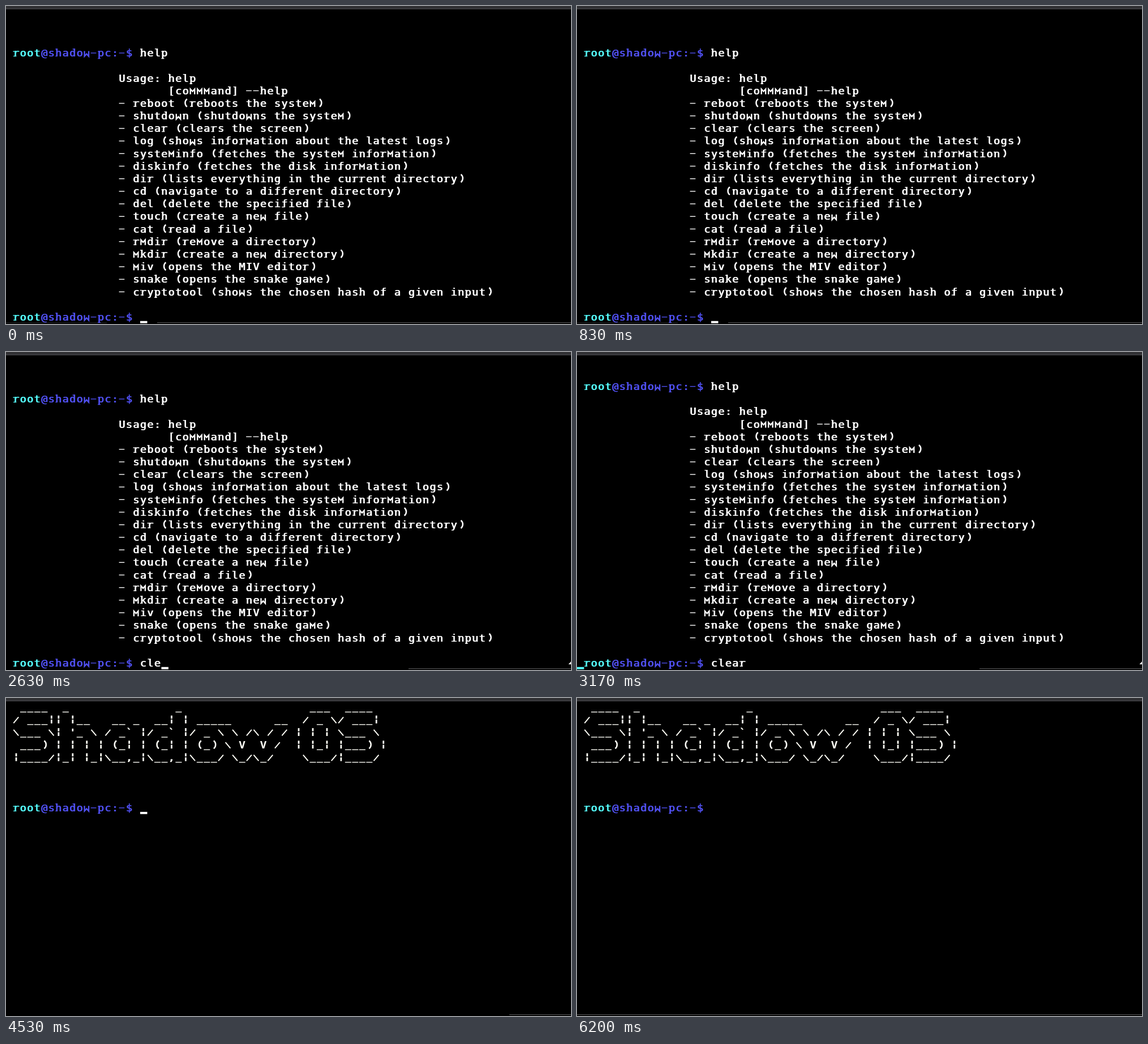
Recreate the animation shown at these times as an HTML page with a canvas. Size 998 by 561 pixels, loop 6.3 s.

```html
<!DOCTYPE html>
<html lang="en">
<head>
<meta charset="utf-8">
<title>Terminal</title>
<style>
  html, body { margin: 0; width: 100%; height: 100%; overflow: hidden; background: #000; }
  canvas { display: block; }
</style>
</head>
<body>
<canvas id="screen" width="998" height="561"></canvas>
<script>
const ctx = document.getElementById('screen').getContext('2d');
const LOOP = 6300;
const U = 998 / 720;               // one text-mode dot
const CW = 9 * U, RH = 16 * U, TOP = 6;
const WHITE = '#fff', CYAN = '#55ffff', BLUE = '#5050f0';
const PROMPT_END = 19;

const help = [
  'Usage: help',
  '       [commmand] --help',
  '- reboot (reboots the system)',
  '- shutdown (shutdowns the system)',
  '- clear (clears the screen)',
  '- log (shows information about the latest logs)',
  '- systeminfo (fetches the system information)',
  '- diskinfo (fetches the disk information)',
  '- dir (lists everything in the current directory)',
  '- cd (navigate to a different directory)',
  '- del (delete the specified file)',
  '- touch (create a new file)',
  '- cat (read a file)',
  '- rmdir (remove a directory)',
  '- mkdir (create a new directory)',
  '- miv (opens the MIV editor)',
  '- snake (opens the snake game)',
  '- cryptotool (shows the chosen hash of a given input)'
];

const banner = [
  " ____  _               _                  ___  ____",
  "/ ___|| |__   __ _  __| | _____      __  / _ \\/ ___|",
  "\\___ \\| '_ \\ / _` |/ _` |/ _ \\ \\ /\\ / / | | | \\___ \\",
  " ___) | | | | (_| | (_| | (_) \\ V  V /  | |_| |___) |",
  "|____/|_| |_|\\__,_|\\__,_|\\___/ \\_/\\_/    \\___/|____/"
];

// Strokes on the dot grid of one character cell
function line(x, y, width, ...p) {
  ctx.lineWidth = width * U;
  ctx.beginPath();
  for (let i = 0; i < p.length; i += 2) ctx.lineTo(x + p[i] * U, y + p[i + 1] * U);
  ctx.stroke();
}

function bow(x, y, from, mid) {
  ctx.lineWidth = 1.8 * U;
  ctx.beginPath();
  ctx.moveTo(x + from * U, y + 2 * U);
  ctx.bezierCurveTo(x + mid * U, y + 4.6 * U, x + mid * U, y + 9.4 * U, x + from * U, y + 12 * U);
  ctx.stroke();
}

const shapes = {
  '_': (x, y) => line(x, y, 1, 0, 13.5, 8, 13.5),
  '-': (x, y) => line(x, y, 1, 0, 7.5, 7, 7.5),
  '/': (x, y) => line(x, y, 1.4, 7, 4, 0.6, 11.6),
  '\\': (x, y) => line(x, y, 1.4, 0.6, 4, 7, 11.6),
  '|': (x, y) => {
    line(x, y, 2, 4, 2, 4, 6);
    line(x, y, 2, 4, 7.2, 4, 12);
  },
  '(': (x, y) => bow(x, y, 5.7, 2.5),
  ')': (x, y) => bow(x, y, 3.7, 6.9),
  'm': (x, y) => line(x, y, 1.7, 1, 12, 1, 5.4, 3.7, 8.4, 6.4, 5.4, 6.4, 12),
  'w': (x, y) => line(x, y, 1.7, 1, 5, 1, 11.6, 3.7, 8.6, 6.4, 11.6, 6.4, 5)
};

// Slab ends: letters, left, right, height
const slabs = [
  ['rnpu', 0, 1.8, 5.5],
  ['hbk', 0, 1.8, 2.5],
  ['d', 3.8, 5.6, 2.5],
  ['rf', 0.5, 4.2, 11.5],
  ['hk', 0, 1.8, 11.5],
  ['p', 0, 3.5, 14.5]
];

function write(text, col, row, color) {
  ctx.fillStyle = ctx.strokeStyle = color;
  [...text].forEach((ch, i) => {
    if (ch === ' ') return;
    const x = (col + i) * CW, y = TOP + row * RH;
    if (shapes[ch]) return shapes[ch](x, y);
    // Doubled sideways: heavy stems, thin bars
    for (const dx of [-0.5, 0.5]) ctx.fillText(ch, x + 3.95 * U + dx, y + 12 * U);
    for (const [letters, left, right, h] of slabs) {
      if (letters.includes(ch)) line(x, y, 1, left, h, right, h);
    }
  });
}

function prompt(row, typed) {
  write('root', 1, row, CYAN);
  write('@shadow-pc:-$', 5, row, BLUE);
  write(typed, PROMPT_END, row, WHITE);
}

function helpRow(src, row, typed) {
  if (src === 3) prompt(row, 'help');
  else if (src === 24) prompt(row, typed);
  else if (src >= 5 && src < 23) write(help[src - 5], 16, row, WHITE);
}

function cursor(t, col, row, color) {
  const period = 457;              // 32 refreshes at 70 Hz
  if ((t - 343 + period) % period >= period / 2) return;
  ctx.fillStyle = color;
  ctx.fillRect(col * CW, TOP + row * RH + 12.6 * U, 9 * U, 2.8 * U);
}

function edges(t) {
  ctx.fillStyle = '#303033';
  ctx.fillRect(0, 0, 998, 5);
  ctx.fillStyle = '#4c4c52';
  ctx.fillRect(0, 4.5, 998, 1.2);
  let from = 267;
  if (t >= 2270) from = 711;
  if (t >= 3250) from = 0;
  if (t >= 3400) from = 889;
  if (t >= 6150) from = 0;
  ctx.fillStyle = '#505052';
  ctx.fillRect(from, 558, 998 - from, 1.2);
  if (t < 2270) {
    ctx.fillStyle = '#2c2c2e';
    ctx.fillRect(0, 558.5, 178, 1);
  }
}

function pointer() {
  ctx.fillStyle = WHITE;
  ctx.beginPath();
  ctx.moveTo(998, 546);
  ctx.lineTo(993.5, 551);
  ctx.lineTo(998, 551);
  ctx.fill();
}

function draw(t) {
  ctx.fillStyle = '#000';
  ctx.fillRect(0, 0, 998, 561);
  ctx.font = '18.5px "DejaVu Sans Mono", monospace';
  ctx.textAlign = 'center';
  ctx.textBaseline = 'alphabetic';
  edges(t);

  if (t < 3250) {
    const keys = Math.max(0, Math.min(5, Math.floor((t - 2270) / 130) + 1));
    const typed = 'clear'.slice(0, keys);
    // The scroll copies rows from the top down
    const moved = t < 3140 ? 0 : t < 3200 ? 11 : 25;
    for (let row = 0; row < 25; row++) helpRow(row < moved ? row + 1 : row, row, typed);
    if (moved) cursor(t, 0, 24, CYAN);
    else cursor(t, PROMPT_END + keys, 24, WHITE);
  } else {
    banner.forEach((text, row) => write(text, 1, row, '#fdfdf6'));
    prompt(8, '');
    cursor(t, PROMPT_END, 8, WHITE);
  }
  if (t >= 1000 && t < 4300) pointer();
}

const start = performance.now();
function tick() {
  draw((performance.now() - start) % LOOP);
  requestAnimationFrame(tick);
}
tick();
</script>
</body>
</html>
```
